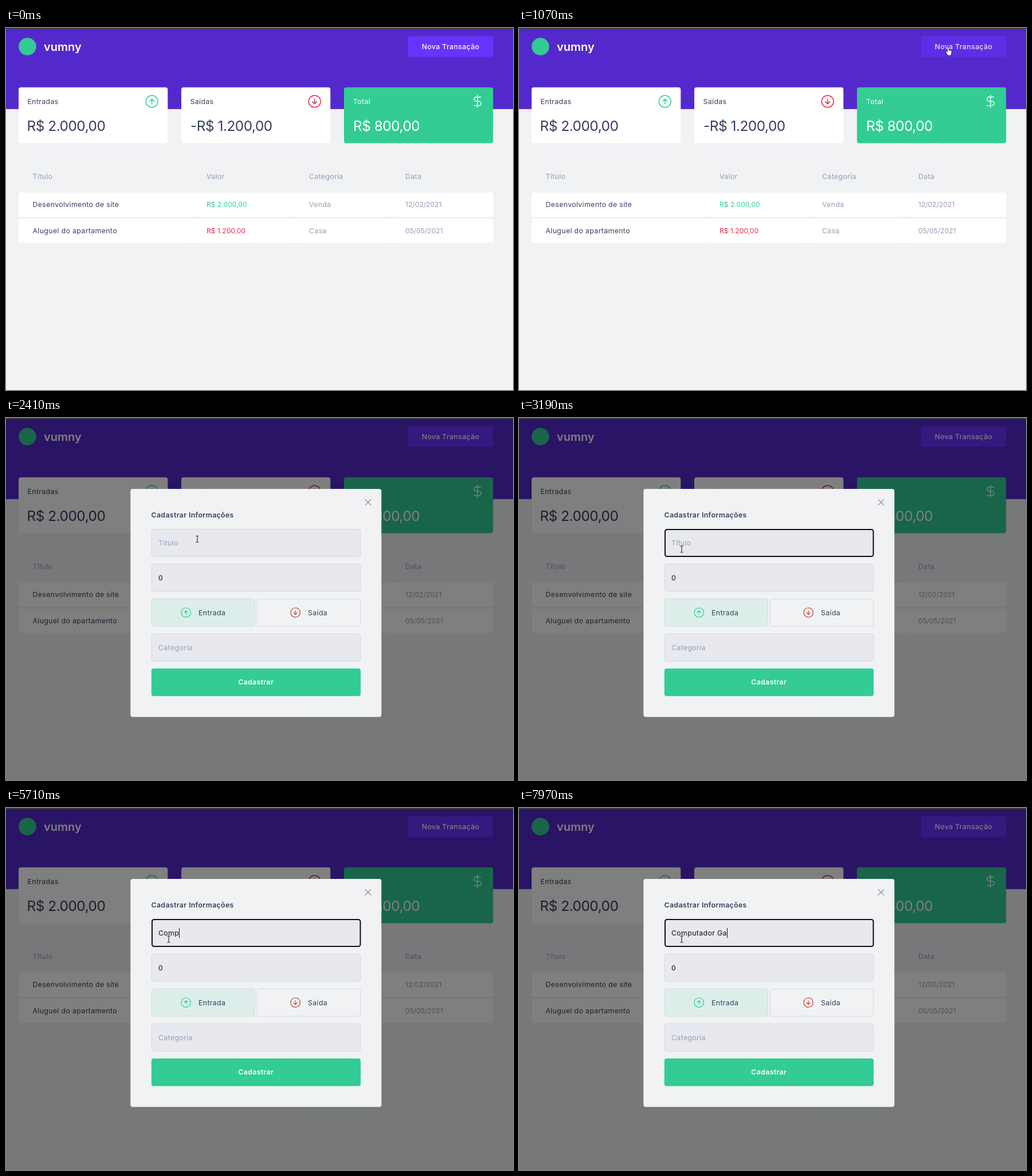
Write an HTML page that moves like this. It is 885 px wide and 633 px high and loops after 8 s.

```html
<!DOCTYPE html>
<html lang="pt-BR">
<head>
<meta charset="utf-8">
<title>Transações</title>
<style>
  html, body { margin: 0; width: 100%; height: 100%; overflow: hidden; background: #f0f2f4; }
  svg { display: block; }
  text { font: 400 12.3px Inter, "Open Sans", sans-serif; letter-spacing: .03em; fill: #363f5f; white-space: pre; }
  .soft { fill: #969cb3; }
  .num { font-size: 12.1px; letter-spacing: 0; }
  .big { font-size: 24.4px; letter-spacing: -.02em; }
  .white { fill: #fff; }
  .medium { font-weight: 500; }
  .bold { font-weight: 600; }
  .name { font-size: 20px; letter-spacing: 0; }
  .green { fill: #33cc95; }
  .red { fill: #e52e4d; }
  .ink { fill: #111; }
  .field rect { fill: #e7e9ee; stroke: #d7d8dc; }
  .line { fill: none; stroke-linecap: round; stroke-linejoin: round; }
</style>
</head>
<body>
<svg width="885" height="633" viewBox="0 0 885 633">
  <defs>
    <g id="arrow" class="line" stroke-width="1.5">
      <circle r="10.4"/>
      <path d="M0 4.2V-4.2M-4-.2 0-4.2 4-.2"/>
    </g>
    <g id="row" fill="#fff">
      <rect x="22" width="304" height="42.3" rx="3"/>
      <rect x="326" width="179" height="42.3" rx="3"/>
      <rect x="505" width="168" height="42.3" rx="3"/>
      <rect x="673" width="177.4" height="42.3" rx="3"/>
    </g>
  </defs>

  <rect width="885" height="633" fill="#f0f2f4"/>
  <rect width="885" height="141.8" fill="#5429cc"/>
  <rect width="885" height="2" fill="#3b3943"/>
  <circle cx="37.4" cy="32.5" r="15.3" fill="#33cc95"/>
  <text class="white bold name" x="66" y="39.5">vumny</text>
  <g id="button">
    <rect x="701.6" y="14.5" width="148.8" height="36.1" rx="2.5" fill="#6933ff"/>
    <text class="white medium" x="776" y="37" text-anchor="middle" font-size="12">Nova Transação</text>
  </g>

  <g fill="#fff">
    <rect x="22" y="103.8" width="260.3" height="97.8" rx="4"/>
    <rect x="306" y="103.8" width="260.3" height="97.8" rx="4"/>
    <rect x="590" y="103.8" width="260.3" height="97.8" rx="4" fill="#33cc95"/>
  </g>
  <text x="37.5" y="133">Entradas</text>
  <text x="321.5" y="133">Saídas</text>
  <text class="white" x="606" y="133">Total</text>
  <text class="big" x="36.5" y="179.5">R$ 2.000,00</text>
  <text class="big" x="322" y="179.5">-R$ 1.200,00</text>
  <text class="big white" x="606" y="179.5">R$ 800,00</text>
  <use href="#arrow" transform="translate(254.7 128.4)" stroke="#33cc95"/>
  <use href="#arrow" transform="translate(538.7 128.4) rotate(180)" stroke="#e52e4d"/>
  <path class="line" stroke="#fff" stroke-width="1.4"
    d="M823 117.3v22M828.6 120.8h-8a3.6 3.6 0 0 0 0 7.3h5a3.75 3.75 0 0 1 0 7.5H816.6"/>

  <text class="soft" x="46.5" y="264">Título</text>
  <text class="soft" x="350" y="264">Valor</text>
  <text class="soft" x="529" y="264">Categoria</text>
  <text class="soft" x="697" y="264">Data</text>
  <use href="#row" y="287.7"/>
  <text x="46.5" y="313">Desenvolvimento de site</text>
  <text class="num green" x="350" y="313">R$ 2.000,00</text>
  <text class="soft" x="529" y="313">Venda</text>
  <text class="num soft" x="697" y="313">12/02/2021</text>
  <use href="#row" y="333.5"/>
  <text x="46.5" y="359">Aluguel do apartamento</text>
  <text class="num red" x="350" y="359">R$ 1.200,00</text>
  <text class="soft" x="529" y="359">Casa</text>
  <text class="num soft" x="697" y="359">05/05/2021</text>

  <g id="modal">
    <rect y="2" width="885" height="631" fill="#000" opacity=".5"/>
    <rect x="217.3" y="124" width="438" height="398.7" rx="4" fill="#f0f2f4"/>
    <path id="close" class="line" stroke="#969ba8" stroke-width="1.5" d="M627.3 142.8l9.4 9.4m0-9.4l-9.4 9.4"/>
    <text class="bold" x="253.5" y="174">Cadastrar Informações</text>
    <g class="field">
      <rect x="254.3" y="194.5" width="364.5" height="47.7" rx="3.5"/>
      <rect x="254.3" y="255.4" width="364.5" height="47.7" rx="3.5"/>
      <rect x="254.3" y="377.4" width="364.5" height="47.7" rx="3.5"/>
      <rect x="254.3" y="316.4" width="180" height="47.7" rx="3.5" style="fill:#ddeeea"/>
      <rect x="438.5" y="316.4" width="180.3" height="47.7" rx="3.5" style="fill:#f0f2f4"/>
    </g>
    <rect x="253.8" y="438" width="365.3" height="48.3" rx="4" fill="#33cc95"/>
    <text class="white bold" x="436.3" y="466.3" text-anchor="middle">Cadastrar</text>
    <text class="ink" x="266" y="283.5">0</text>
    <text x="336" y="344.5">Entrada</text>
    <text x="527" y="344.5">Saída</text>
    <text class="soft" x="266" y="405.5">Categoria</text>
    <use href="#arrow" transform="translate(314.2 340.2) scale(.79)" stroke="#33cc95"/>
    <use href="#arrow" transform="translate(505.2 340.2) rotate(180) scale(.79)" stroke="#c8412f"/>
    <rect id="focus" x="255" y="195" width="363.5" height="47" rx="3.5" fill="none" stroke="#101010" stroke-width="2"/>
    <text id="hint" class="soft" x="266" y="222.5">Título</text>
    <text id="typed" class="ink" x="266" y="222.5"></text>
    <rect id="caret" y="210" width="1" height="17" fill="#111"/>
  </g>

  <g id="cursor" stroke="#111" stroke-width=".8" stroke-linejoin="round" fill="#fff">
    <path id="pointer" d="M0 0V11.6L2.7 9.1l1.9 4.1 1.8-.8-1.8-4H8Z"/>
    <path id="hand" d="M-1.3 1.2a1.3 1.3 0 0 1 2.6 0V5.5l3.4.8q1.9.5 1.8 2.4l-.6 3.5q-.4 3-2.6 3H1.2q-1.6 0-2.6-1.6L-4.2 9.4q-.6-1.2.4-1.6 1.1-.3 2.5 1.5Z"/>
    <path id="beam" fill="none" stroke-width="1" d="M-2.5-5.5h1.8l.7.7.7-.7h1.8M0-5V5M-2.5 5.5h1.8l.7-.7.7.7h1.8"/>
  </g>
</svg>
<script>
const LOOP = 8000, OPEN = 1690, CLICK = 2720, STEP = 80;
const TEXT = 'Computador Ga';
const keys = [4930, 5090, 5320, 5710, 6020, 6180, 6340, 6490, 6730, 6810, 7120, 7820, 7970];
const blinks = [3190, 3730, 4290, 4840, 7660, 7820];

const $ = id => document.getElementById(id);
const show = (id, on) => $(id).style.display = on ? '' : 'none';
const clamp = v => Math.min(1, Math.max(0, v));
const mix = (a, b, k) => a + (b - a) * k;
const passed = (times, t) => times.filter(v => v <= t).length;

const stepped = (t, a, b) => clamp(Math.floor((t - a) / STEP) * STEP / (b - a));

function cursorAt(t) {
  if (t < OPEN) {
    const k = 1 - (1 - stepped(t, 510, 1070)) ** 2;
    return [mix(772, 749, k), mix(69, 33, k)];
  }
  if (t >= 2570) return [284, 229.5];
  const p = stepped(t, OPEN, 2490), k = p * p * (3 - 2 * p);
  return [mix(748, 322, k), mix(33, 217, k)];
}

function draw(t) {
  const [x, y] = cursorAt(t);
  const open = t >= OPEN, inField = open && y > 194;
  const onButton = !open && y < 51;
  $('cursor').setAttribute('transform', `translate(${x} ${y})`);
  show('cursor', t >= 510);
  show('hand', onButton);
  show('beam', inField);
  show('pointer', !onButton && !inField);

  const hover = clamp((t - 670) / 200) - clamp((t - OPEN - STEP) / 200);
  $('button').style.filter = `brightness(${1 - .1 * hover})`;

  show('modal', open);
  show('close', t >= OPEN + STEP);
  show('focus', t >= CLICK);

  const count = passed(keys, t);
  show('hint', !count);
  $('typed').textContent = TEXT.slice(0, count);
  const width = open && count ? $('typed').getComputedTextLength() : 0;
  $('caret').setAttribute('x', Math.round(266 + width));
  show('caret', t >= CLICK && passed(blinks, t) % 2 === 0);
}

const start = performance.now();
function frame() {
  draw((performance.now() - start) % LOOP);
  requestAnimationFrame(frame);
}
frame();
</script>
</body>
</html>
```
